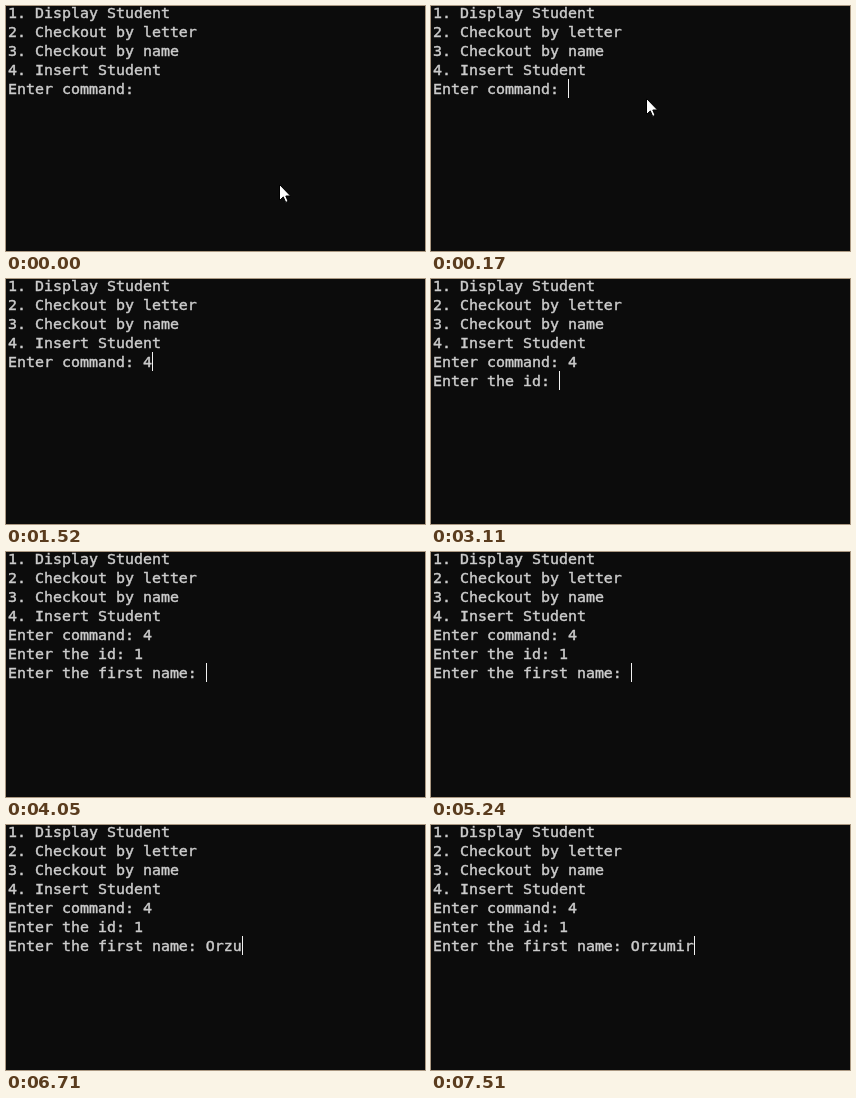
An HTML page that plays this animation: 419 px wide and 245 px high, repeating every 8 s.

```html
<!DOCTYPE html>
<html lang="en">
<head>
<meta charset="utf-8">
<title>Student console</title>
<style>
  html, body { margin: 0; width: 100%; height: 100%; overflow: hidden; background: #0c0c0c; }
  svg { display: block; width: 419px; height: 245px; }
  text {
    font: 14.95px "DejaVu Sans Mono", monospace;
    fill: #ccc;
    stroke: #ccc;
    stroke-width: .45px;
    white-space: pre;
  }
</style>
</head>
<body>
<svg viewBox="0 0 419 245">
  <rect width="419" height="245" fill="#0c0c0c"/>
  <g id="lines"></g>
  <rect id="caret" width="1" height="19" fill="#f2f2f2" shape-rendering="crispEdges"/>
  <g id="mouse">
    <path d="M.5 .5V16.5L4.3 12.9L6.7 18.4L9.1 17.4L6.8 12H11.6Z" fill="#fff" stroke="#000"/>
    <circle id="click" r="12" fill="#ff0" fill-opacity=".47"/>
  </g>
</svg>
<script>
const LOOP = 8000, CELL = 9, ROW = 19, LEFT = 2, TOP = -3, BASE = 15;
const $ = id => document.getElementById(id);

const menu = '1. Display Student\n2. Checkout by letter\n3. Checkout by name\n' +
  '4. Insert Student\nEnter command: ';

// [time, output added at that time]
const output = [
  [0, menu],
  [1520, '4'],
  [1980, '\nEnter the id: '],
  [3650, '1'],
  [4050, '\nEnter the first name: ']
];
const keyTimes = [5770, 6120, 6380, 6710, 6910, 7180, 7510];
[...'Orzumir'].forEach((ch, i) => output.push([keyTimes[i], ch]));

// Blink phases with the caret hidden
const hidden = [[0, 120], [660, 1190], [2580, 3110], [4650, 5240]];

// [time, x, y] of the pointer
const pointer = [[0, 273, 178], [70, 256, 152], [120, 231, 115], [170, 215, 92]];

const within = (t, [from, to]) => t >= from && t < to;
const show = (el, on) => el.setAttribute('visibility', on ? 'visible' : 'hidden');

const rows = Array.from({ length: 7 }, (_, i) => {
  const row = document.createElementNS('http://www.w3.org/2000/svg', 'text');
  row.setAttribute('x', LEFT);
  row.setAttribute('y', TOP + BASE + i * ROW);
  return $('lines').appendChild(row);
});

function draw(t) {
  const lines = output.filter(e => e[0] <= t).map(e => e[1]).join('').split('\n');
  rows.forEach((row, i) => {
    const line = lines[i] || '';
    if (row.textContent !== line) row.textContent = line;
  });

  const last = lines.length - 1;
  $('caret').setAttribute('x', LEFT + lines[last].length * CELL);
  $('caret').setAttribute('y', TOP + last * ROW);
  show($('caret'), !hidden.some(span => within(t, span)));

  const [, x, y] = pointer.filter(p => p[0] <= t).pop();
  $('mouse').setAttribute('transform', `translate(${x} ${y})`);
  $('mouse').style.display = t < 1520 ? '' : 'none';
  show($('click'), within(t, [450, 520]));
}

const start = performance.now();
function tick() {
  draw((performance.now() - start) % LOOP);
  requestAnimationFrame(tick);
}
tick();
</script>
</body>
</html>
```
